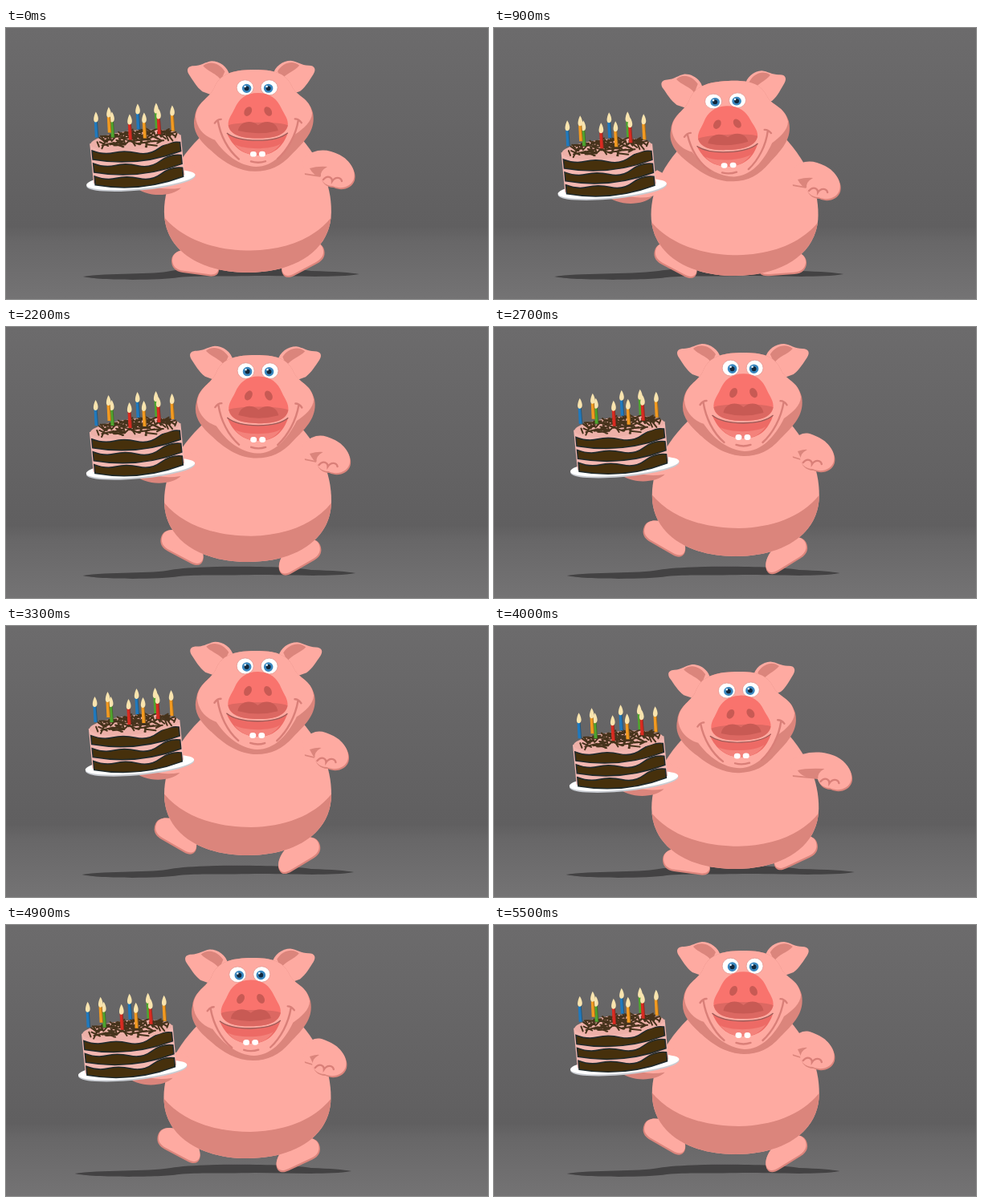
These frames come from a looping animation (600x338 px, 5600 ms). An HTML page:

```html
<!DOCTYPE html>
<html lang="en">
<head>
<meta charset="utf-8">
<title>Dancing pig with cake</title>
<style>
  html, body { margin: 0; width: 100%; height: 100%; overflow: hidden; background: #666566; }
  svg { display: block; width: 100%; height: 100%; }
  .skin { fill: #feaaa1; }
  .shade { fill: #db857c; }
  .crease { fill: none; stroke: #d97f78; stroke-width: 2.4; stroke-linecap: round; }
  .choc { fill: #46300c; stroke: #1f2a2c; stroke-width: 1.5; }
  .icing { fill: #f3b7b1; }
</style>
</head>
<body>
<svg viewBox="0 0 600 338" preserveAspectRatio="none">
  <defs>
    <linearGradient id="wall" x2="0" y2="1">
      <stop offset="0" stop-color="#6c6b6c"/>
      <stop offset=".73" stop-color="#605f60"/>
      <stop offset=".79" stop-color="#686768"/>
      <stop offset="1" stop-color="#747374"/>
    </linearGradient>
    <clipPath id="bodyClip"><use href="#torso"/></clipPath>
    <path id="torso" d="M255 105C214 140 197 176 197 210C197 257 240 286 301 286C362 286 405 257 405 210C405 176 392 142 355 105Z"/>
    <path id="ear" d="M283 38C281 27 270 20 260 20C252 21 246 26 237 26C229 26 227 31 231 37C236 44 240 52 248 58L270 66Z"/>
    <path id="fold" d="M249 26C257 19 270 22 277 33L272 44C267 36 255 33 249 26Z"/>
    <path id="sole" d="M-30 2C-31 -8 -20 -15 -4 -15C14 -15 28 -5 30 5C31 12 26 15 18 15H-14C-24 15 -29 10 -30 2Z"/>
    <g id="foot">
      <use href="#sole" class="shade"/>
      <use href="#sole" class="skin" transform="translate(0 -1) scale(.97 .92)"/>
    </g>
  </defs>

  <rect width="600" height="338" fill="url(#wall)"/>
  <path id="shadow" fill="#434243"/>

  <use href="#foot" id="leftFoot"/>
  <use href="#foot" id="rightFoot"/>
  <g id="body">
    <use href="#torso" class="skin"/>
    <g clip-path="url(#bodyClip)">
      <path id="belly" class="shade" d="M190 200C214 237 260 251 305 251C350 250 390 235 412 200V290H190Z"/>
    </g>
  </g>

  <path id="armShade" class="shade"/>
  <path id="arm" class="skin"/>
  <path id="armFold" class="shade"/>
  <path id="fingers" class="crease" d="M-19 6C-14 0 -8 3 -8 8C-4 2 3 3 4 8"/>

  <g id="cake">
    <path class="skin" d="M176 178C192 190 212 187 224 178L240 160L222 150Z"/>
    <path class="shade" d="M158 180C170 195 204 195 216 183Q190 187 176 178Z"/>
    <g transform="rotate(-5.5 166 173)">
      <ellipse cx="166" cy="174.5" rx="68" ry="11.5" fill="#c9ccd2"/>
      <ellipse cx="166" cy="173" rx="68" ry="11" fill="#fff"/>
      <g id="layers"></g>
      <ellipse cx="164" cy="123" rx="56" ry="12" fill="#edb0a8"/>
      <path id="shavings" fill="none" stroke="#46331c" stroke-width="2" stroke-linecap="round"/>
    </g>
    <g id="candles"></g>
  </g>

  <g id="head">
    <g id="ears">
      <use href="#ear" class="skin"/><use href="#fold" class="shade"/>
      <g transform="matrix(-1 0 0 1 622 0)"><use href="#ear" class="skin"/><use href="#fold" class="shade"/></g>
    </g>
    <g id="skull">
      <path class="shade" d="M262 52C270 34 290 31 311 31C333 31 350 34 358 52C364 66 379 66 384 86C388 108 374 122 358 138C344 154 330 160 312 160C292 160 274 149 260 136C245 123 232 110 237 90C240 70 256 68 262 52Z"/>
      <path class="skin" d="M262 52C270 34 290 31 311 31C333 31 350 34 358 52C364 66 380 66 383 86C383 97 372 106 362 113C350 137 334 154 313 154C292 153 274 138 262 120C250 116 239 106 238 90C240 70 256 68 262 52Z"/>
    </g>
    <g id="face">
      <path class="crease" d="M259 96C261 93 264 91 267 91M263 93C266 112 275 131 289 143M359 91C362 91 365 93 367 96M363 93C360 112 350 131 337 143"/>
      <path d="M274 109C290 122 335 122 350 109C344 127 333 138 313 138C293 138 281 126 274 109Z" fill="#ed6a65"/>
      <path d="M284 124C296 131 330 131 341 123C334 133 326 138 313 138C299 138 290 132 284 124Z" fill="#f4827b"/>
      <path d="M274 109C290 122 335 122 350 109" fill="none" stroke="#9b5b58" stroke-width="1.3"/>
      <rect x="303" y="133" width="8" height="7" rx="3.5" fill="#fff"/>
      <rect x="314" y="133" width="8" height="7" rx="3.5" fill="#fff"/>
      <path class="crease" d="M304 146Q313 149 322 146"/>
      <g id="eyes"></g>
      <path d="M313 57C328 57 337 65 342 77C346 86 351 91 350 100C347 113 331 116 313 116C295 116 279 113 276 100C275 91 280 86 284 77C289 65 298 57 313 57Z" fill="#f9736d"/>
      <path d="M276 99C286 94 340 94 350 99C347 113 331 116 313 116C295 116 279 113 276 99Z" fill="#dc6862"/>
      <path d="M288 106C290 94 304 91 313 99C322 91 336 94 338 106Q313 113 288 106Z" fill="#c85a54"/>
      <ellipse cx="300.5" cy="81" rx="4.4" ry="6.5" transform="rotate(28 300.5 81)" fill="#c85a54"/>
      <ellipse cx="325.5" cy="81" rx="4.4" ry="6.5" transform="rotate(-28 325.5 81)" fill="#c85a54"/>
    </g>
  </g>
</svg>

<script>
const LOOP = 5600, STEP = 100, BEAT = 560;
const el = id => document.getElementById(id);
const set = (id, name, value) => el(id).setAttribute(name, value);
const place = (id, value) => set(id, 'transform', value);

// Periodic smooth curve through rows of [time, ...values]
function curve(rows, period) {
  const n = rows.length;
  const at = i => {
    const turn = Math.floor(i / n), [t, ...v] = rows[i - turn * n];
    return [t + turn * period, ...v];
  };
  return time => {
    const u = ((time % period) + period) % period;
    let i = n - 1;
    while (rows[i][0] > u) i--;
    const [a, b, c, d] = [-1, 0, 1, 2].map(k => at(i + k));
    const span = c[0] - b[0], s = (u - b[0]) / span, r = 1 - s;
    return b.slice(1).map((_, k) => {
      k++;
      const m0 = (c[k] - a[k]) / (c[0] - a[0]) * span;
      const m1 = (d[k] - b[k]) / (d[0] - b[0]) * span;
      return b[k] * (1 + 2 * s) * r * r + m0 * s * r * r
           + c[k] * s * s * (3 - 2 * s) - m1 * s * s * r;
    });
  };
}
const wave = (mid, amp, peak) => t => mid + amp * Math.cos((t - peak) / BEAT * 2 * Math.PI);

// head drop, body drop
const bounce = curve([[0, 21, 19], [60, 35, 23], [80, 26, 17], [140, 10, 5],
  [180, 1, 0], [220, 0, 0], [240, 4, 7]], BEAT / 2);
// x, y, angle of the left foot; the right one mirrors it half a beat later
const step = curve([[0, 236, 292, 8], [60, 241, 293, 4], [80, 240, 293, 8], [140, 238, 285, 25],
  [180, 238, 283, 32], [240, 236, 285, 30], [280, 232, 287, 28], [340, 228, 288, 28],
  [360, 226, 281, 25], [420, 217, 273, 28], [460, 214, 262, 30], [500, 213, 260, 30],
  [520, 221, 273, 28]], BEAT);
const headSway = curve([[0, -2], [80, -9], [140, -19], [210, -26], [280, -24], [340, -17],
  [420, -5], [460, -1], [500, 0], [520, 0]], BEAT);
const headTilt = wave(-2, 2.3, 500);
const faceTurn = wave(-1.2, 4.5, 45);
const cakeX = wave(155.5, 12.5, 545);
const fistX = wave(417, 13.5, 160);
const shadowRight = wave(441, 11, 150);
const bodyX = wave(-1, 1, 520);

function buildCake() {
  const layer = y => `<path class="choc" d="M109 ${y}Q123 ${y + 7} 136 ${y + 5}T164 ${y + 8}T192 ${y + 5}T219 ${y}V${y + 11}Q164 ${y + 26} 109 ${y + 11}Z"/>`;
  el('layers').innerHTML = '<path class="icing" d="M107 122H221V172Q164 190 107 172Z"/>'
    + [131, 147, 163].map(layer).join('');

  let seed = 7, strokes = '';
  const random = () => (seed = seed * 16807 % 2147483647) / 2147483647;
  for (let i = 0; i < 110; i++) {
    const angle = random() * 6.283, radius = Math.sqrt(random());
    const x = 164 + 53 * radius * Math.cos(angle), y = 122 + 10 * radius * Math.sin(angle);
    const turn = random() * 6.283, size = 4 + random() * 4;
    const dx = size * Math.cos(turn), dy = size * .5 * Math.sin(turn);
    strokes += `M${x - dx} ${y - dy}L${x + dx} ${y + dy}`;
  }
  set('shavings', 'd', strokes);

  const blue = '#2079bd', orange = '#f39a20', green = '#4fa52f', red = '#d92b21';
  el('candles').innerHTML = [
    [162, 78, blue], [185, 77, green], [130, 88, green], [126, 82, orange], [110, 88, blue],
    [188, 84, red], [205, 80, orange], [152, 91, red], [170, 89, orange]
  ].map(([x, y, color]) => `<path d="M${x - 2} ${y + 12}h4l1.5 20h-4.5z" fill="${color}"/>
    <path d="M${x + 1.6} ${y + 12}l1.5 20" stroke="#2b261c" stroke-opacity=".4"/>
    <path d="M${x} ${y}C${x + 5} ${y + 8} ${x + 3} ${y + 13} ${x} ${y + 13}C${x - 4} ${y + 13} ${x - 3} ${y + 6} ${x} ${y}Z" fill="#f9e4ae"/>`).join('');
}

function buildEyes() {
  el('eyes').innerHTML = [[297, 299], [327, 326]].map(([x, iris]) => `
    <ellipse cx="${x}" cy="50" rx="10.5" ry="10" fill="#fff" stroke="#e39a93" stroke-width=".8"/>
    <circle cx="${iris}" cy="51" r="5.8" fill="#3a87bf"/>
    <circle cx="${iris}" cy="51" r="3" fill="#12283c"/>
    <circle cx="${iris - 2}" cy="48.6" r="1.3" fill="#e8f4fb"/>`).join('');
}

function drawArm(x, y) {
  const arm = `M370 ${y - 18}C385 ${y - 31} ${x - 14} ${y - 31} ${x + 2} ${y - 23}C${x + 16} ${y - 16} ${x + 23} ${y - 2} ${x + 20} ${y + 7}C${x + 17} ${y + 17} ${x + 4} ${y + 21} ${x - 6} ${y + 16}C${x - 16} ${y + 16} ${x - 21} ${y + 9} ${x - 22} ${y + 3}L372 ${y}Z`;
  set('armShade', 'd', arm);
  set('arm', 'd', arm);
  place('arm', 'translate(-1 -2)');
  set('armFold', 'd', `M378 ${y - 8}Q388 ${y - 11} ${x - 14} ${y - 10}Q${x - 23} ${y - 5} ${x - 22} ${y + 2}Q383 ${y + 2} 378 ${y - 8}Z`);
  place('fingers', `translate(${x} ${y})`);
}

function draw(t) {
  const [drop, bodyDrop] = bounce(t);
  place('body', `translate(${bodyX(t)} ${bodyDrop})`);
  place('belly', `translate(0 ${bodyDrop * .4})`);

  const [lx, ly, la] = step(t), [rx, ry, ra] = step(t + BEAT / 2);
  place('leftFoot', `translate(${lx} ${ly}) rotate(${la})`);
  place('rightFoot', `translate(${600 - rx} ${ry}) scale(-1 1) rotate(${ra})`);

  // The head shortens a little as it sinks
  place('head', `translate(${headSway(t)[0]} ${drop}) rotate(${headTilt(t)} 311 85)`);
  place('ears', `translate(${311 - drop * .17} 0) scale(${1 - drop * .0016} 1) translate(-311 0)`);
  place('skull', `translate(0 31) scale(1 ${1 - drop * .0008}) translate(0 -31)`);
  place('face', `translate(${faceTurn(t)} ${50 + drop * .16}) scale(1 ${1 - drop * .002}) translate(0 -50)`);

  place('cake', `translate(${cakeX(t) - 166} ${drop * .78})`);
  drawArm(fistX(t), 162 + drop);

  const left = cakeX(t) - 72, right = shadowRight(t);
  set('shadow', 'd', `M${left} 310C${left + 30} 305 ${left + 90} 308 205 303C240 297 350 298 380 303Q${right - 15} 304 ${right} 307C${right - 30} 312 350 309 310 309C260 310 240 309 215 311C190 315 ${left + 20} 315 ${left} 310Z`);
}

function tick() {
  draw(Math.floor(performance.now() / STEP) * STEP % LOOP);
  requestAnimationFrame(tick);
}
buildCake();
buildEyes();
tick();
</script>
</body>
</html>
```
